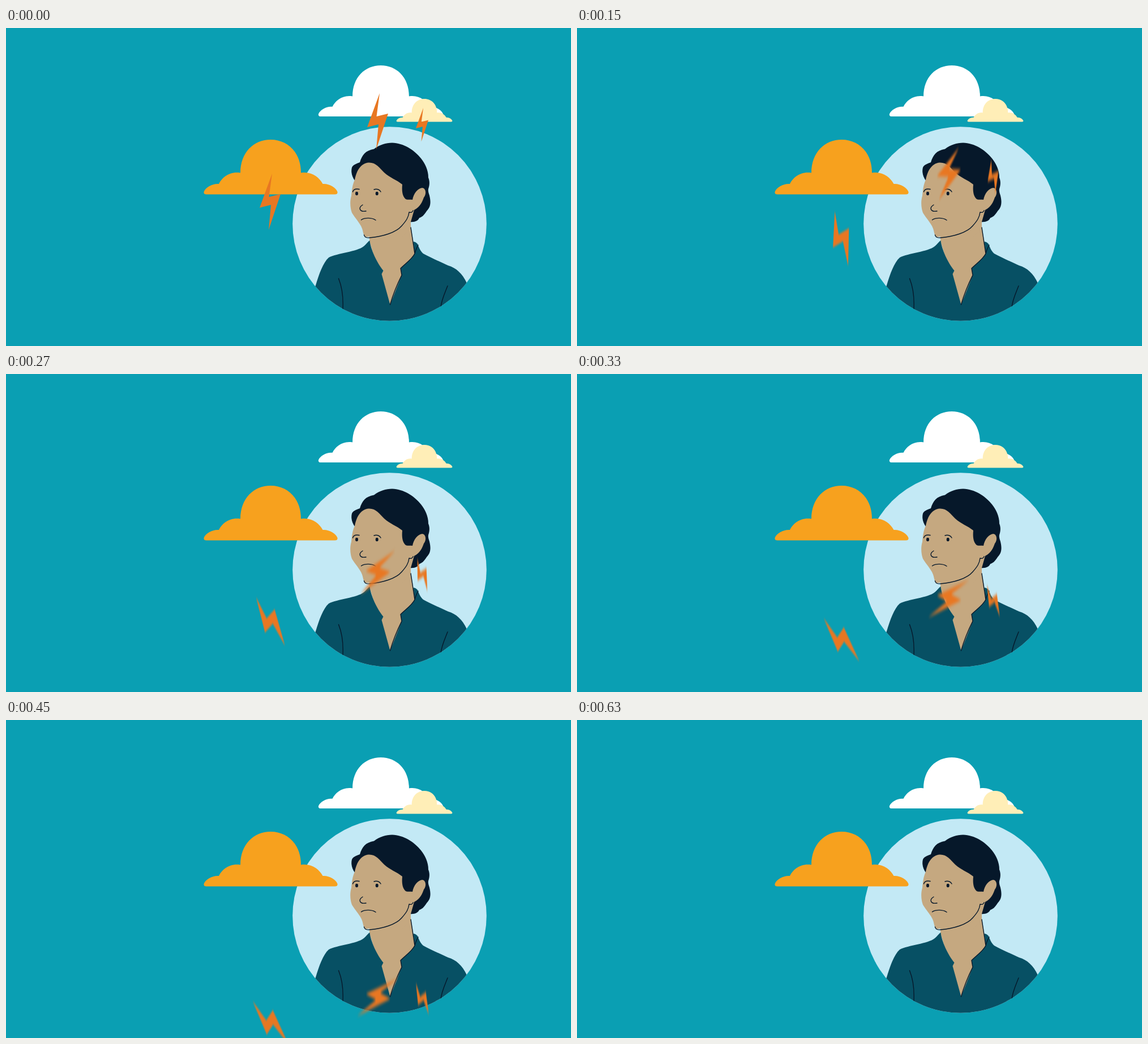
Animation of 998 by 561 pixels, one loop 1.93 s. Source, as an HTML page:

```html
<!DOCTYPE html>
<html lang="en">
<head>
<meta charset="utf-8">
<title>Storm clouds</title>
<style>
  html, body { margin: 0; width: 100%; height: 100%; overflow: hidden; background: #0a9fb3; }
  svg { display: block; width: 100vw; height: 100vh; }
  .hair { fill: #06182a; }
  .skin { fill: #c5a880; }
  .shirt { fill: #075064; }
  .line { fill: none; stroke: #06182a; stroke-width: 1.4; stroke-linecap: round; stroke-linejoin: round; }
</style>
</head>
<body>
<svg id="stage" viewBox="0 0 998 561">
  <defs>
    <clipPath id="disc"><circle cx="677.5" cy="345.5" r="171.3"/></clipPath>
    <!-- cloud: origin at the middle of its base -->
    <path id="cloud" d="M-113.5 0C-117.5 0-119-2.5-117.5-5.5C-115-12-103-19.5-91.5-18.5C-86-29.5-73-41-53.5-38C-53.5-74-30-96.5 0-96.5S53.5-74 53.5-38C73-41 86-29.5 92-18.5C103-19.5 115-12 117.5-5.5C119-2.5 117.5 0 113.5 0Z"/>
    <!-- bolt: origin at its centre -->
    <path id="bolt" d="M3-49L-19 11L1 6L-3 50L18-13L-2.5-8Z" fill="#e87722"/>
  </defs>

  <rect width="998" height="561" fill="#0a9fb3"/>
  <circle cx="677.5" cy="345.5" r="171.3" fill="#c3e9f5"/>

  <g clip-path="url(#disc)">
    <path class="hair" d="M616 269C611 262 609 254 611 246C613 241 620 239 625 237C629 224 635 216 650 213.5C660 206 671 202.5 682 202.5C702 203 721 215 733 230C742 241 746 253 746 264C749 271 748 278 746 284C745 290 748 293 748.5 298C751 310 749 317 743 323C738 331 734 334 730 335C728 340 722 343 713 342L700 300Z"/>
    <path class="skin" d="M642 360V376L660 436L678 492L702 440L723 398L715 350L700 330Z"/>
    <path class="skin" d="M616 268C618 255 625 241 637 238C652 235 659 246 668 255C678 264 690 268 700 276C699 287 700 296 705 301C708 304 713 302 718 303C720 292 727 283 735 282C742 282.500 743 293 738 299C735 307 732 315 721 321L715 342V353L700 368H642L634 369C632 366 631 362 630 357C628 347 617 336 611 326C608 318 607 306 610 296C611 285 612 276 616 268Z"/>
    <path class="shirt" d="M547 454C553 434 560 414 570 405C585 397 620 395 632 385C637 381 639 377 642.500 375C644 390 655 414 666.500 428L663.500 434L678.500 488L699 436L697 424C706 415 717 408 722 398L719.500 377C723 377 725 379 727 381C729 386 732 394 737 398C750 405 768 413 781 419C795 423 806 433 814 450L850 530H510Z"/>
    <path class="line" d="M678.500 488C683 472 692 450 699 436L697 424C706 415 717 408 722 398L715 352M722 398C723 392 726 387 728 383"/>
    <path class="line" d="M587.500 442C594 458 596 475 595 496M780 455C775 468 769 480 768 493"/>
    <path class="line" d="M632.500 365C633 368.500 636 370.500 642 370C665 368 689 361 699 349C707 340 711 334 712 325C715 326 718 325 719 322"/>
    <path class="line" d="M612.500 289C614 284.500 619 283.500 624 284.500M650 285C655 283 660 285 662 289"/>
    <path class="line" d="M630 312C622 317 624 325 636 323"/>
    <path class="line" d="M627.500 338.500C633 334.500 646 334 653 339" stroke-width="1.8"/>
    <ellipse class="hair" cx="619.5" cy="292" rx="2.5" ry="3.2"/>
    <ellipse class="hair" cx="655.2" cy="292" rx="2.5" ry="3.2"/>
  </g>

  <use href="#cloud" fill="#fff" transform="translate(662 156) scale(.933)"/>
  <use href="#cloud" fill="#ffeeb7" transform="translate(739 165.400) scale(.418)"/>
  <use href="#cloud" fill="#f7a11e" transform="translate(467.500 293.500)"/>
</svg>

<script>
  const LOOP = 1930, STEP = 30, START = 30, TURN_TIME = 300, FALL_END = 630;
  const SVG = "http://www.w3.org/2000/svg";
  const stage = document.getElementById("stage");

  // speed in px per ms, turn in degrees
  const bolts = [
    { x: 657, y: 164, scale: 1, speed: 0.773, turn: 44 },
    { x: 735.3, y: 170.4, scale: 0.6, speed: 0.765, turn: -26 },
    { x: 467, y: 306, scale: 1, speed: 0.5425, turn: -43 }
  ];

  function add(parent, tag, attrs) {
    const node = parent.appendChild(document.createElementNS(SVG, tag));
    for (const key in attrs) node.setAttribute(key, attrs[key]);
    return node;
  }

  bolts.forEach((bolt, i) => {
    const filter = add(stage, "filter", {
      id: "blur" + i, filterUnits: "userSpaceOnUse", x: 0, y: 0, width: 998, height: 620,
      "color-interpolation-filters": "sRGB"
    });
    bolt.blur = add(filter, "feGaussianBlur", { stdDeviation: "0 0" });
    bolt.layer = add(stage, "g", {});
    bolt.shape = add(bolt.layer, "use", { href: "#bolt" });
  });

  function draw(time) {
    const t = Math.floor(time / STEP) * STEP;
    const fall = Math.max(0, t - START);
    const turned = Math.min(1, fall / TURN_TIME);
    // half-frame shutter; it is only half in motion when the fall begins
    const shutter = t < START ? 0 : t === START ? STEP / 4 : STEP / 2;

    bolts.forEach((bolt, i) => {
      const y = bolt.y + bolt.speed * fall;
      bolt.shape.setAttribute("transform",
        `translate(${bolt.x} ${y}) rotate(${bolt.turn * turned}) scale(${bolt.scale})`);
      bolt.blur.setAttribute("stdDeviation", `0 ${bolt.speed * shutter / Math.sqrt(12)}`);
      bolt.layer.setAttribute("filter", shutter ? `url(#blur${i})` : "none");
      bolt.layer.setAttribute("visibility", t < FALL_END ? "visible" : "hidden");
    });
  }

  const begin = performance.now();
  function tick() {
    draw((performance.now() - begin) % LOOP);
    requestAnimationFrame(tick);
  }
  draw(0);
  requestAnimationFrame(tick);
</script>
</body>
</html>
```
